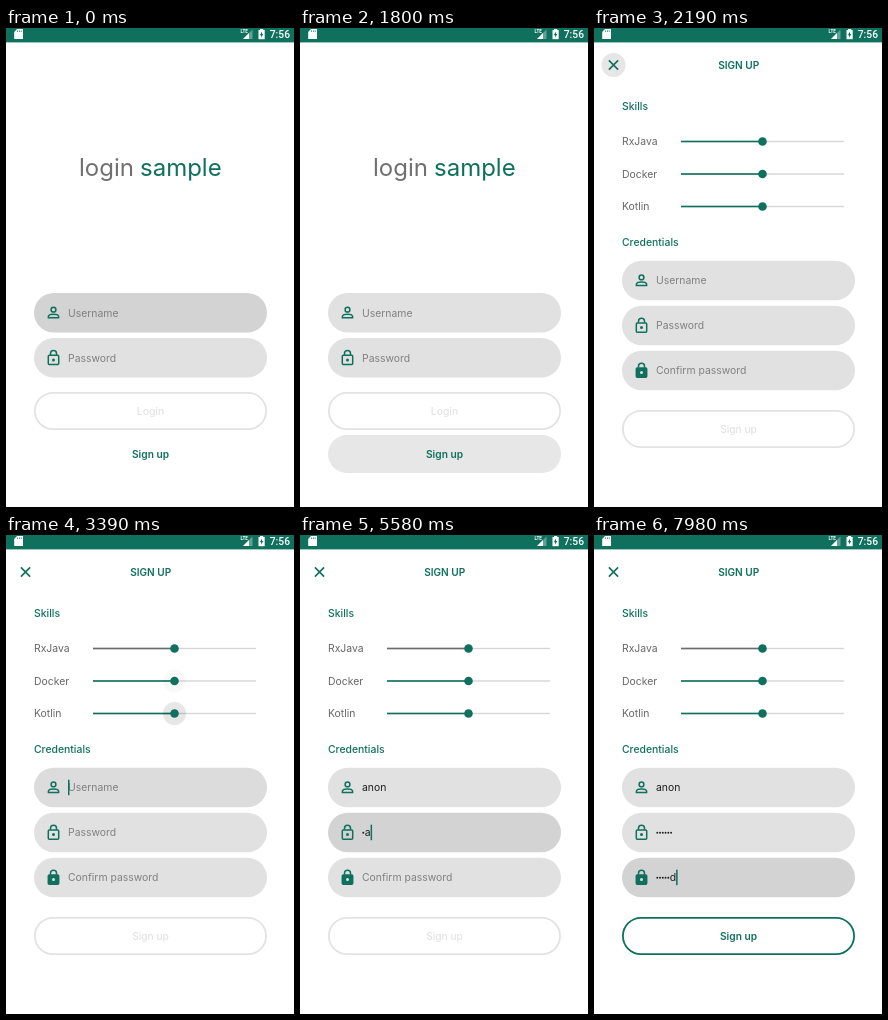
These frames come from a looping animation (288 by 479 pixels, 8000 ms). An HTML page with a canvas:

```html
<!DOCTYPE html>
<html lang="en">
<head>
<meta charset="utf-8">
<title>Login sample</title>
<style>
  html, body { margin: 0; width: 100%; height: 100%; overflow: hidden; background: #fff; }
  canvas { display: block; width: 288px; height: 479px; }
</style>
</head>
<body>
<canvas></canvas>
<script>
const W = 288, H = 479, LOOP = 8000;
const TEAL = '#0f705e', HINT = '#818181', INK = '#202020', OFF = '#e3e3e3', RED = '#f0062f';
const FONT = 'Inter, sans-serif';
const BAR = 14.4, OPEN_AT = 1805;
const canvas = document.querySelector('canvas');
const c = canvas.getContext('2d');
const dpr = window.devicePixelRatio || 1;
canvas.width = W * dpr;
canvas.height = H * dpr;

const clamp = (v, lo = 0, hi = 1) => Math.min(hi, Math.max(lo, v));
const grey = v => `rgb(${v},${v},${v})`;
const mixGrey = (a, b, k) => grey(Math.round(a + (b - a) * k));

// Focus highlight: quick fade in, slower fade out.
const focusLevel = (t, [from, to]) => clamp((t - from) / 120) * (1 - clamp((t - to) / 300));
const hasFocus = (t, [from, to]) => t >= from && t < to;

function text(str, x, y, color, { size = 10.4, weight = 400, align = 'left', family = FONT } = {}) {
  c.font = `${weight} ${size}px ${family}`;
  c.textAlign = align;
  c.fillStyle = color;
  c.fillText(str, x, y);
}

function pill(y, h, fill, stroke) {
  const inset = stroke ? 0.9 : 0;
  c.beginPath();
  c.roundRect(28 + inset, y + inset, 233 - 2 * inset, h - 2 * inset, h / 2 - inset);
  if (fill) { c.fillStyle = fill; c.fill(); }
  if (stroke) { c.strokeStyle = stroke; c.lineWidth = 1.8; c.stroke(); }
}

function disc(x, y, r, color) {
  c.fillStyle = color;
  c.beginPath();
  c.arc(x, y, r, 0, 7);
  c.fill();
}

function poly(color, ...points) {
  c.fillStyle = color;
  c.beginPath();
  points.forEach(([x, y]) => c.lineTo(x, y));
  c.fill();
}

function rect(x, y, w, h, color) {
  c.fillStyle = color;
  c.fillRect(x, y, w, h);
}

function person(x, y) {
  c.strokeStyle = TEAL;
  c.lineWidth = 1.5;
  c.beginPath();
  c.arc(x, y - 2.8, 2.4, 0, 7);
  c.stroke();
  c.beginPath();
  c.moveTo(x - 5.1, y + 5.2);
  c.lineTo(x - 5.1, y + 3.8);
  c.bezierCurveTo(x - 4.2, y + 1.2, x + 4.2, y + 1.2, x + 5.1, y + 3.8);
  c.lineTo(x + 5.1, y + 5.2);
  c.closePath();
  c.stroke();
}

function lock(x, y, solid) {
  c.strokeStyle = c.fillStyle = TEAL;
  c.lineWidth = 1.5;
  c.beginPath();
  c.moveTo(x - 3, y - 2.5);
  c.lineTo(x - 3, y - 4);
  c.arc(x, y - 4, 3, Math.PI, 0);
  c.lineTo(x + 3, y - 2.5);
  c.stroke();
  c.beginPath();
  c.roundRect(x - 5.2, y - 2.3, 10.4, 9.4, 1);
  if (solid) c.fill();
  c.stroke();
  disc(x, y + 2.4, 1.5, solid ? '#e1e1e1' : TEAL);
}

// typing: { word, start, step, masked }
const typedCount = (t, k) => k ? clamp(Math.floor((t - k.start) / k.step) + 1, 0, k.word.length) : 0;

function field(t, y, hint, icon, focus, typing) {
  pill(y, 39.5, mixGrey(225, 211, focusLevel(t, focus)));
  icon(47.5, y + 19.5);
  const n = typedCount(t, typing), focused = hasFocus(t, focus), base = y + 23.5;
  let x = 62;
  if (!n) {
    text(hint, x, base, HINT);
  } else {
    let shown = typing.word.slice(0, n);
    if (typing.masked) {
      const dots = focused ? n - 1 : n;
      for (let i = 0; i < dots; i++) disc(x + 1.3 + i * 2.75, y + 20, 0.95, INK);
      x += dots * 2.75;
      shown = shown.slice(dots);
    }
    text(shown, x, base, INK);
    x += c.measureText(shown).width;
  }
  const last = n ? typing.start + (n - 1) * typing.step : focus[0];
  if (focused && (t - last) % 1000 < 500) rect(x, y + 12, 1.5, 15.5, TEAL);
}

function slider(t, label, y, focus, idleColor) {
  text(label, 28, y + 3.5, '#666');
  rect(87, y - 0.7, 163, 1.4, '#d6d6d6');
  rect(87, y - 0.8, 81, 1.6, idleColor && t > focus[1] ? idleColor : TEAL);
  const k = focusLevel(t, focus);
  if (k) disc(168.5, y, 11.5, `rgba(0,0,0,${0.11 * k})`);
  disc(168.5, y, 4.3, TEAL);
}

function loginScreen(t) {
  rect(0, 0, W, H, '#fff');
  text('login', 73, 148, '#707070', { size: 24 });
  text('sample', 134, 148, TEAL, { size: 24 });
  field(t, 265, 'Username', person, [-500, 500]);
  field(t, 310, 'Password', lock, [500, 1200]);
  pill(364, 38, null, OFF);
  text('Login', 144.5, 387, OFF, { weight: 500, align: 'center' });
  pill(407, 38, mixGrey(255, 231, focusLevel(t, [1200, LOOP])));
  text('Sign up', 144.5, 430, TEAL, { weight: 600, align: 'center', size: 10.2 });
}

const nameKeys = { word: 'anon', start: 3900, step: 200 };
const passKeys = { word: 'passwd', start: 5350, step: 200, masked: true };
const confirmKeys = { ...passKeys, start: 6900 };

function mismatch() {
  disc(242.7, 342.5, 7, RED);
  rect(241.8, 338.2, 1.8, 5.2, '#fff');
  rect(241.8, 344.8, 1.8, 1.8, '#fff');
  c.save();
  c.shadowColor = 'rgba(0,0,0,.35)';
  c.shadowBlur = 3;
  c.shadowOffsetY = 1;
  rect(188, 358, 70, 27, '#121212');
  c.restore();
  rect(188, 358, 70, 1.8, RED);
  poly(RED, [238.5, 358.2], [243.5, 353.5], [248.5, 358.2]);
  text('Mismatch', 222.5, 376.5, '#fff', { align: 'center' });
}

function signUpScreen(t) {
  rect(0, 0, W, H, '#fff');
  const close = focusLevel(t, [0, 2650]);
  if (close) disc(19.5, 37, 12, mixGrey(255, 230, close));
  c.strokeStyle = TEAL;
  c.lineWidth = 1.6;
  c.beginPath();
  c.moveTo(14.9, 32.4); c.lineTo(24.1, 41.6);
  c.moveTo(24.1, 32.4); c.lineTo(14.9, 41.6);
  c.stroke();
  text('SIGN UP', 144.7, 40.8, TEAL, { weight: 600, align: 'center', size: 10.1 });
  text('Skills', 28, 82, TEAL, { weight: 500 });
  slider(t, 'RxJava', 113.5, [2650, 2930], '#6b6b6b');
  slider(t, 'Docker', 146, [2930, 3150]);
  slider(t, 'Kotlin', 178.5, [3150, 3350]);
  text('Credentials', 28, 217.6, TEAL, { weight: 500 });
  field(t, 232.7, 'Username', person, [3350, 5050], nameKeys);
  field(t, 277.7, 'Password', lock, [5050, 6600], passKeys);
  field(t, 322.7, 'Confirm password', (x, y) => lock(x, y, true), [6600, LOOP], confirmKeys);

  const n = typedCount(t, confirmKeys), matched = n === confirmKeys.word.length;
  pill(382, 38, null, matched ? TEAL : OFF);
  text('Sign up', 144.5, 404.8, matched ? TEAL : OFF, { weight: matched ? 600 : 500, align: 'center', size: 10.2 });
  if (n && !matched) mismatch();
}

function statusBar(drop) {
  rect(0, 0, W, BAR + drop, TEAL);
  poly('#fff', [11, 1], [17, 1], [17, 11], [8.2, 11], [8.2, 4]);
  for (const x of [11.2, 13, 14.8]) rect(x, 2.4, 0.7, 1.6, TEAL);
  text('LTE', 234.5, 5, '#fff', { size: 4.6, weight: 700, family: 'Roboto, sans-serif' });
  poly('rgba(255,255,255,.35)', [246.5, 1.5], [246.5, 11], [237, 11]);
  poly('#fff', [243, 5], [243, 11], [237, 11]);
  rect(254, 1, 3.2, 2, '#fff');
  rect(252.5, 2, 6.2, 9.2, '#fff');
  poly(TEAL, [256, 3.5], [253.8, 7.2], [255.2, 7.2], [255, 9.7], [257.3, 6], [256, 6]);
  text('7:56', 284, 10.3, '#fff', { size: 10.3, weight: 500, align: 'right', family: 'Roboto, sans-serif' });
}

function draw(t) {
  c.setTransform(dpr, 0, 0, dpr, 0, 0);
  const age = t - OPEN_AT, opening = age >= 0;
  const drop = opening ? 38 * (1 - clamp(age / 350)) ** 5 : 0;
  if (age < 200) loginScreen(t);
  if (opening) {
    // The old screen dims while the new one fades in and rises.
    rect(0, 0, W, H, `rgba(0,0,0,${0.3 * clamp(age / 217)})`);
    c.save();
    c.globalAlpha = 1 - (1 - clamp(age / 200)) ** 3;
    c.translate(0, drop);
    signUpScreen(t);
    c.restore();
  }
  statusBar(clamp(drop, 0, 6));
}

const start = performance.now();
function tick() {
  draw((performance.now() - start) % LOOP);
  requestAnimationFrame(tick);
}
tick();
</script>
</body>
</html>
```
